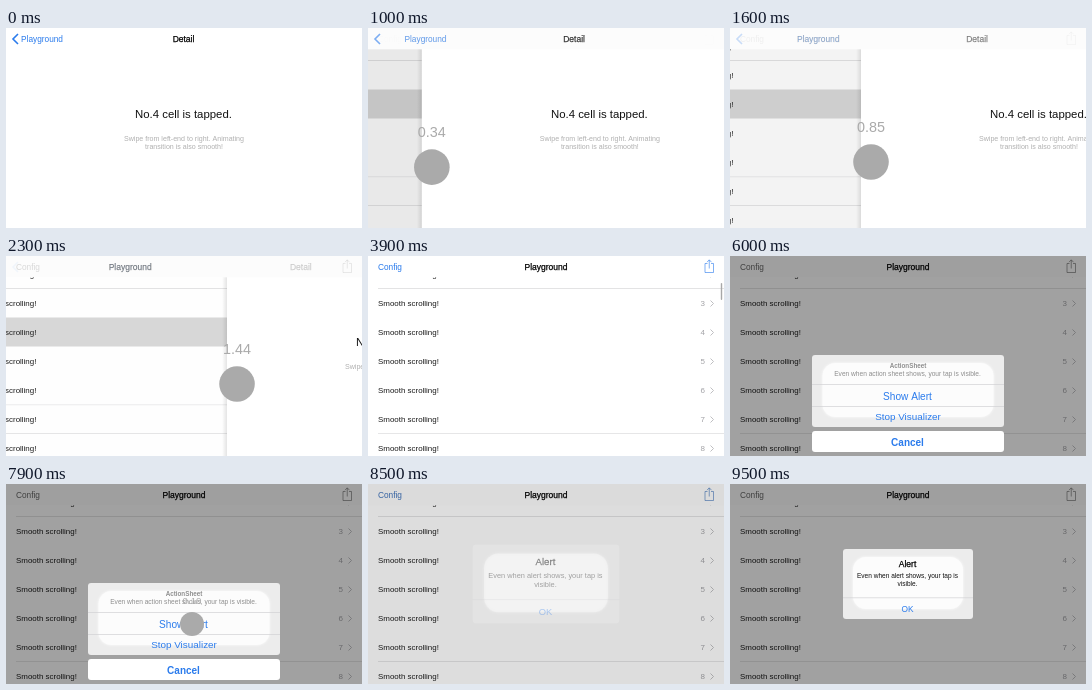
Write an HTML page with a canvas that moves like this. It is 356x200 px and loops after 9.7 s.

```html
<!DOCTYPE html>
<html lang="en">
<head>
<meta charset="utf-8">
<title>Touch playground</title>
<style>
  html, body { margin: 0; width: 100%; height: 100%; overflow: hidden; background: #fff; }
  canvas { display: block; width: 100vw; height: 100vh; }
</style>
</head>
<body>
<canvas id="stage"></canvas>
<script>
const W = 356, H = 200, LOOP = 9700, STEP = 100;
const FONT = '"Liberation Sans", Arial, sans-serif';
const BLUE = [42, 123, 236], GRAY = [100, 100, 100];
const canvas = document.getElementById('stage');
const ctx = canvas.getContext('2d');

const clamp = x => Math.max(0, Math.min(1, x));
const ramp = (t, a, b) => clamp((t - a) / (b - a));
const easeOut = x => 1 - (1 - x) ** 3;
const smooth = x => x * x * (3 - 2 * x);
const mix = (a, b, k) => `rgb(${a.map((v, i) => Math.round(v + (b[i] - v) * k)).join()})`;
const blue = mix(BLUE, BLUE, 0);

function text(str, x, y, size, color, align = 'center', bold = false) {
  ctx.font = `${bold ? 'bold ' : ''}${size}px ${FONT}`;
  ctx.textAlign = align;
  ctx.textBaseline = 'alphabetic';
  ctx.fillStyle = color;
  ctx.fillText(str, x, y + size * 0.35);
}

// Medium weight: regular letters with a thin outline.
function title(str, x, y) {
  text(str, x, y, 8.5, '#000');
  ctx.strokeStyle = '#000';
  ctx.lineWidth = 0.25;
  ctx.strokeText(str, x, y + 8.5 * 0.35);
}

function rect(x, y, w, h, color) {
  ctx.fillStyle = color;
  ctx.fillRect(x, y, w, h);
}

function panel(x, y, w, h, r, color) {
  ctx.beginPath();
  ctx.roundRect(x, y, w, h, r);
  ctx.fillStyle = color;
  ctx.fill();
}

function stroke(points, color, width) {
  ctx.beginPath();
  points.forEach(([x, y], i) => i ? ctx.lineTo(x, y) : ctx.moveTo(x, y));
  ctx.strokeStyle = color;
  ctx.lineWidth = width;
  ctx.stroke();
}

function layer(alpha, draw) {
  if (alpha <= 0) return;
  ctx.save();
  ctx.globalAlpha *= alpha;
  draw();
  ctx.restore();
}

// How far the detail page has been pushed to the right, in pixels.
function pageShift(t) {
  if (t < 600) return 0;
  const drag = 2.4 + 0.1286 * (Math.min(t, 2530) - 600);
  return drag + (W - drag) * easeOut(ramp(t, 2530, 3100));
}

function drawList(t, p) {
  const selected = 1 - ramp(t, 3600, 3900);
  ctx.save();
  ctx.translate(-0.3 * W * (1 - p), 0);
  rect(0, 0, W * 1.4, H, '#fff');
  layer(selected, () => rect(0, 61.5, W * 1.4, 29, '#d8d8d8'));
  for (let n = 2; n <= 8; n++) {
    const y = 47.5 + (n - 3) * 29;
    text('Smooth scrolling!', 10, y, 7.95, '#1c1c1c', 'left');
    text(n, 337, y, 8, '#a2a2a6', 'right');
    stroke([[342.5, y - 3], [345.5, y], [342.5, y + 3]], '#b8b8bc', 0.9);
  }
  rect(10, 32, W, 0.8, '#dcdcde');
  rect(10, 177, W, 0.8, '#e0e0e2');
  if (p < 1) rect(10, 148.5, W, 0.7, '#e4e4e6');
  ctx.restore();
  rect(0, 0, W, H, `rgba(0,0,0,${0.11 * (1 - ramp(p, 0, 0.65))})`);
  layer(ramp(t, 3200, 3500) * (1 - ramp(t, 4300, 4700)), () =>
    panel(352.8, 27, 1.4, 17, 0.7, '#a8a8a8'));
}

function drawDetail(shift) {
  if (shift >= W) return;
  if (shift > 0) {
    const g = ctx.createLinearGradient(shift - 5, 0, shift, 0);
    g.addColorStop(0, 'rgba(0,0,0,0)');
    g.addColorStop(1, 'rgba(0,0,0,.1)');
    rect(shift - 5, 20, 5, H, g);
  }
  ctx.save();
  ctx.translate(shift, 0);
  rect(0, 0, W, H, '#fff');
  text('No.4 cell is tapped.', 177.5, 86, 11.4, '#111');
  text('Swipe from left-end to right. Animating', 178, 110.5, 7.08, '#b0b0b0');
  text('transition is also smooth!', 178, 118.5, 7.08, '#b0b0b0');
  ctx.restore();
}

function drawShare(color) {
  stroke([[339.5, 7.5], [337, 7.5], [337, 16.5], [345.5, 16.5], [345.5, 7.5], [343, 7.5]], color, 0.6);
  stroke([[341.25, 12.5], [341.25, 4]], color, 0.6);
  stroke([[339, 6.2], [341.25, 3.8], [343.5, 6.2]], color, 0.6);
}

function drawNav(t, p, dim) {
  const moving = p > 0 && p < 1;
  rect(0, 0, W, 21.3, moving || dim ? '#fcfcfc' : '#fff');
  const out = (1 - p) ** 2, into = p * p;
  const mid = 36 + 142 * p;
  layer(out * (1 - p), () => stroke([[12, 6], [7, 11], [12, 16]], blue, 1.6));
  layer(out, () => {
    title('Detail', 177.5 + 189 * p, 10.8);
    text('Playground', mid, 10.8, 8.3, blue);
  });
  layer(into, () => title('Playground', mid, 10.8));
  const live = ramp(t, 2600, 3500);
  const tint = mix(GRAY, BLUE, live * (1 - dim));
  layer(into * (0.6 + 0.4 * live), () => {
    text('Config', 10, 10.8, 8.3, tint, 'left');
    drawShare(tint);
  });
}

function frosted(x, y, w, h, inset) {
  panel(x, y, w, h, 3, '#ececec');
  ctx.save();
  ctx.shadowColor = '#fff';
  ctx.shadowBlur = 3;
  panel(x + inset, y + 8, w - 2 * inset, h - 18, 13, '#fcfcfc');
  ctx.restore();
}

function drawSheet(k) {
  if (k <= 0) return;
  ctx.save();
  ctx.translate(0, 105 * (1 - k));
  frosted(82, 99, 192, 72, 10.5);
  text('ActionSheet', 178, 110, 6.3, '#8e8e8e', 'center', true);
  text('Even when action sheet shows, your tap is visible.', 177.5, 118, 6.6, '#8e8e8e');
  rect(82, 128, 192, 0.7, '#d2d2d4');
  rect(82, 150, 192, 0.7, '#d2d2d4');
  text('Show Alert', 177.5, 140, 10.1, blue);
  text('Stop Visualizer', 178, 161, 9.9, blue);
  panel(82, 175, 192, 21, 3, '#fff');
  text('Cancel', 177.5, 186, 10, blue, 'center', true);
  ctx.restore();
}

function drawAlert(k) {
  layer(k, () => {
    const s = 1.2 - 0.2 * k;
    ctx.translate(178, 100);
    ctx.scale(s, s);
    ctx.translate(-178, -100);
    frosted(113, 65, 130, 70, 10);
    title('Alert', 177.5, 80);
    text('Even when alert shows, your tap is', 177.5, 92, 6.55, '#111');
    text('visible.', 177.5, 100, 6.55, '#111');
    rect(113, 113.5, 130, 0.7, '#d2d2d4');
    text('OK', 177.5, 125, 8.3, blue);
  });
}

const touches = [
  { from: 592, to: 2530, at: t => [pageShift(t) + 10, 142.6 - 0.0086 * (t - 600)] },
  { from: 5050, to: 5250, at: () => [341, 11] },
  { from: 6385, to: 7400, at: t => {
    const a = Math.PI + 2 * Math.PI * smooth(ramp(t, 6400, 7400));
    return [202 + 39 * Math.cos(a), 138 + 32 * Math.sin(a)];
  } },
  { from: 7781, to: 7980, at: () => [186, 140] }
];

function drawTouch(t, { from, to, at }) {
  if (t < from || t > to + 250) return;
  const now = Math.min(t, to), age = now - from;
  const scale = 0.5 + 0.5 * smooth(ramp(t, from, from + 300));
  const [x, y] = at(now);
  layer(clamp(0.3 + (t - from) / 150) * (1 - ramp(t, to, to + 250)), () => {
    ctx.translate(x, y);
    ctx.scale(scale, scale);
    ctx.beginPath();
    ctx.arc(0, 0, 17.8, 0, 2 * Math.PI);
    ctx.fillStyle = '#aaa';
    ctx.fill();
    text((age * 0.000843).toFixed(2), 0, -35, 14.4, '#aaa');
  });
}

function draw(t) {
  const shift = pageShift(t), p = shift / W;
  const sheet = easeOut(ramp(t, 5200, 5900)) * (1 - smooth(ramp(t, 7950, 8300)));
  const alert = easeOut(ramp(t, 8420, 9000));
  const dim = Math.max(sheet, alert);
  rect(0, 0, W, H, '#fff');
  if (p > 0) drawList(t, p);
  drawDetail(shift);
  drawNav(t, p, dim);
  rect(0, 0, W, H, `rgba(0,0,0,${0.37 * dim})`);
  drawSheet(sheet);
  drawAlert(alert);
  touches.forEach(touch => drawTouch(t, touch));
}

function resize() {
  const dpr = window.devicePixelRatio || 1;
  canvas.width = Math.round(innerWidth * dpr);
  canvas.height = Math.round(innerHeight * dpr);
}

const start = performance.now();
function tick() {
  const t = (performance.now() - start) % LOOP;
  ctx.setTransform(canvas.width / W, 0, 0, canvas.height / H, 0, 0);
  draw(Math.floor(t / STEP) * STEP);
  requestAnimationFrame(tick);
}
addEventListener('resize', resize);
resize();
tick();
</script>
</body>
</html>
```
